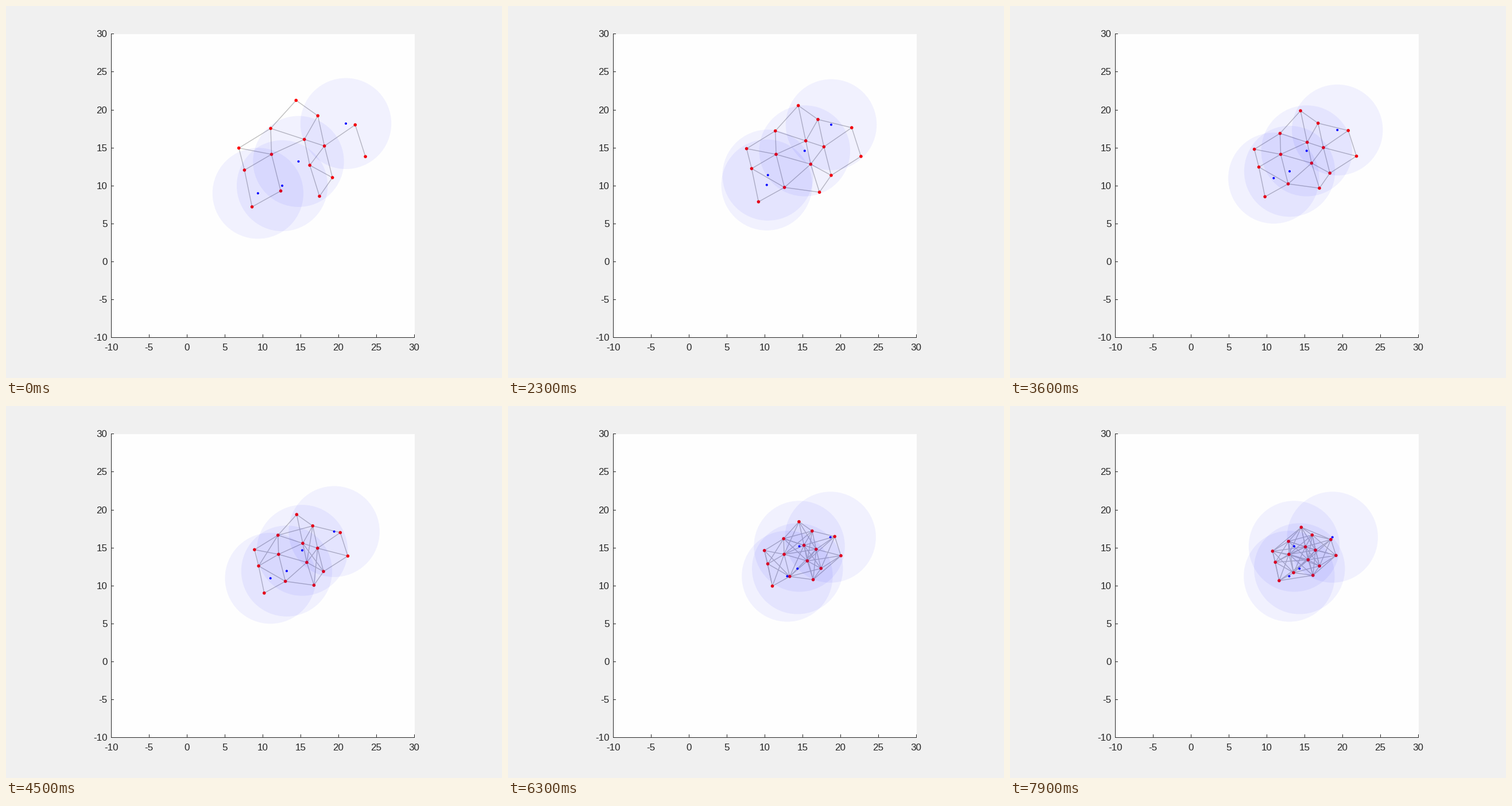
Animation of 864x648 px, one loop 8 s. Source, as a matplotlib script:

```python
import numpy as np
import matplotlib.pyplot as plt
from matplotlib.animation import FuncAnimation
from matplotlib.collections import LineCollection
from matplotlib.patches import Circle, Rectangle

W, H = 864, 648
FRAMES, STEP = 80, 100
UNIT = 13.203                     # pixels per axis unit
LEFT, BOTTOM = 183.4, 577.1       # pixel position of (-10, -10)
LINK, RANGE = 5.0, 6.0            # link distance, sensing radius
GAIN, LAG = 0.1235, 2.4           # pull towards the centre, build-up in s
INK = "#262626"

# Start layout of the agents, which contract around a fixed centre.
CENTRE = np.array([14.69, 14.14])
AGENTS = np.array([
    (14.38, 21.26), (17.25, 19.23), (11.03, 17.56), (6.83, 14.97),
    (15.47, 16.11), (18.12, 15.24), (22.18, 18.03), (23.53, 13.84),
    (11.14, 14.14), (7.57, 12.06), (16.19, 12.70), (19.18, 11.07),
    (12.36, 9.31), (17.47, 8.61), (8.57, 7.21)])
PAIRS = np.array(np.triu_indices(len(AGENTS), 1)).T

# Targets glide to their next waypoint during shared legs of equal length.
LEG = 0.9
STARTS = (0.4, 1.4, 2.7, 4.4, 5.4, 6.8)
TARGETS = [                       # (legs used, waypoints)
    ((0, 2, 3, 4),
     [(9.35, 9), (10.25, 10.1), (10.9, 11), (11.8, 10.85), (12.95, 11.25)]),
    ((0, 2, 3),
     [(12.55, 10), (10.4, 11.4), (13, 11.9), (14.3, 12.25)]),
    ((0, 1, 3, 4, 5),
     [(14.7, 13.2), (15.8, 14.7), (15.25, 14.6), (14.75, 15.2),
      (14.55, 15.2), (13.6, 15.2)]),
    ((0, 1, 2, 3, 4),
     [(20.95, 18.2), (21.45, 17), (18.75, 18.05), (19.3, 17.35),
      (20.25, 15.5), (18.65, 16.4)]),
]


def to_px(p):
    p = np.asarray(p, float)
    return (LEFT, BOTTOM) + (p + 10) * (UNIT, -UNIT)


def spread(t):
    return np.exp(-GAIN * (t - LAG * (1 - np.exp(-t / LAG))))


def target_at(t, legs, points):
    points = np.array(points)
    done = [np.clip((t - STARTS[n]) / LEG, 0, 1) for n in legs]
    return points[0] + done @ np.diff(points, axis=0)


plt.rcParams["font.family"] = "Liberation Sans"
fig = plt.figure(figsize=(W / 72, H / 72), dpi=72, facecolor="#f0f0f0")
ax = fig.add_axes([0, 0, 1, 1])
ax.set(xlim=(0, W), ylim=(H, 0))
ax.axis("off")


def line(x, y):
    ax.plot(x, y, color=INK, lw=1, zorder=1, snap=False,
            solid_capstyle="butt")


def draw_axes():
    x0, x1, y0, y1 = 183, 712, 577, 49
    ax.add_patch(Rectangle((x0, y1), x1 - x0, y0 - y1, fc="#fefefe",
                           lw=0, zorder=0))
    line([x0 + .5] * 2, [y1, y0 + 1])
    line([x0, x1], [y0 + .5] * 2)
    for v in range(-10, 31, 5):
        x, y = np.floor(to_px((v, v))) + .5
        line([x, x], [y0, y0 - 5])
        line([x0, x0 + 5], [y, y])
        label = dict(s=str(v), size=17, color=INK, va="baseline")
        ax.text(x - .5, 599.8, ha="center", **label)
        ax.text(176.3, y + 5.8, ha="right", **label)


def disc(radius, color, z, alpha=1):
    return ax.add_patch(Circle((0, 0), radius, fc=color, alpha=alpha, lw=0,
                               zorder=z))


def place(discs, points):
    for d, p in zip(discs, to_px(points)):
        d.center = tuple(p)


draw_axes()
links = LineCollection([], colors="#bebebe", linewidths=1.4, zorder=2)
ax.add_collection(links)
agents = [disc(2.8, "red", 3) for _ in AGENTS]
zones = [disc(RANGE * UNIT, "blue", 4, .05) for _ in TARGETS]
dots = [disc(2.0, "blue", 5) for _ in TARGETS]


def update(i):
    t = i * STEP / 1000
    pos = CENTRE + (AGENTS - CENTRE) * spread(t)
    ends = pos[PAIRS]
    near = np.hypot(*(ends[:, 0] - ends[:, 1]).T) < LINK
    links.set_segments(to_px(ends[near]))
    place(agents, pos)

    spots = [target_at(t, *target) for target in TARGETS]
    place(zones, spots)
    place(dots, spots)
    return [links, *agents, *zones, *dots]


anim = FuncAnimation(fig, update, frames=FRAMES, interval=STEP,
                     repeat=True, repeat_delay=0)
plt.show()
```
